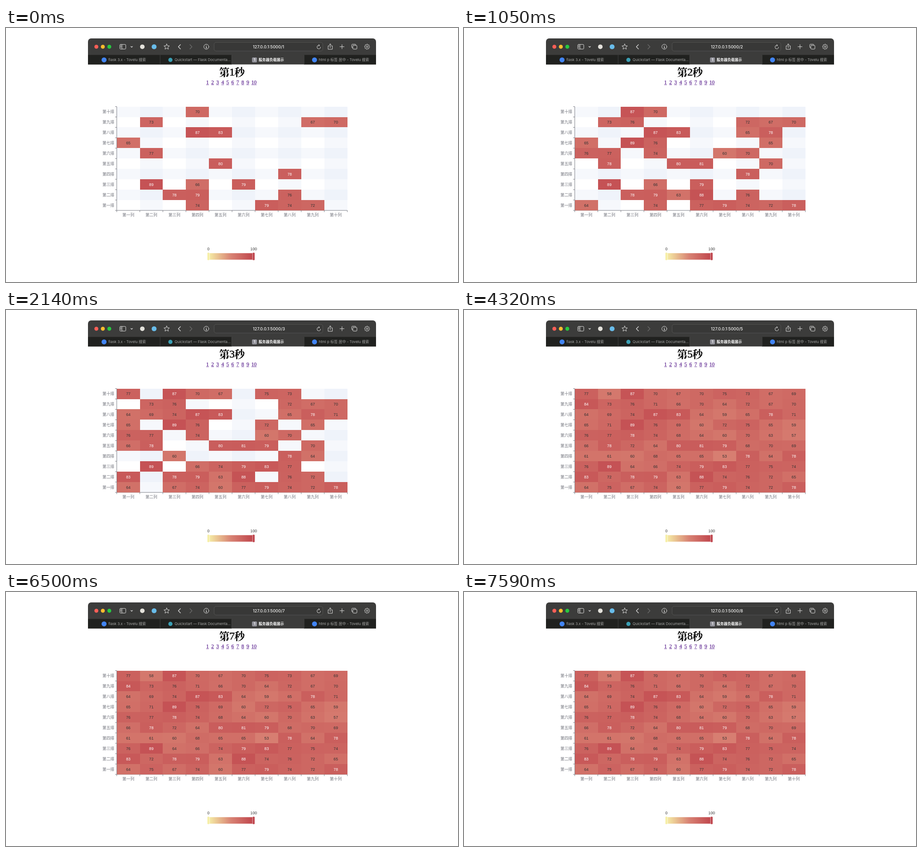
Recreate the animation shown at these times as an HTML page. Size 998x561 px, loop 8 s.

```html
<!DOCTYPE html>
<html lang="zh">
<head>
<meta charset="utf-8">
<title>服务器负载展示</title>
<style>
  html, body { margin: 0; width: 100%; height: 100%; overflow: hidden; background: #fff; }
  svg { display: block; width: 100vw; height: 100vh; }
  text { white-space: pre; }
  .ui { font: 8px Inter, "Noto Sans CJK SC", "Noto Sans CJK", sans-serif; fill: #a6a6a5; }
  .chart { font: 8.7px "Liberation Sans", "Noto Sans CJK SC", "Noto Sans CJK", sans-serif; }
  .serif { font-family: "Liberation Serif", "Noto Serif CJK SC", "Noto Sans CJK SC", "Noto Sans CJK", serif; }
  .icon { fill: none; stroke: #dededd; stroke-width: 1; stroke-linecap: round; stroke-linejoin: round; }
  .crisp { shape-rendering: crispEdges; }
</style>
</head>
<body>
<svg id="stage" viewBox="0 0 998 561">
  <defs>
    <linearGradient id="ramp">
      <stop offset="0" stop-color="#f6efa6"/>
      <stop offset=".5" stop-color="#d88273"/>
      <stop offset="1" stop-color="#bf444c"/>
    </linearGradient>
  </defs>

  <!-- browser window -->
  <path d="M181 80.5V30a7 7 0 0 1 7-7H810a7 7 0 0 1 7 7V80.5Z" fill="#3c3c3b"/>
  <path d="M181 59.5H498V80.5H181ZM658 59.5H817V80.5H658Z" fill="#20211f"/>
  <path d="M340.3 59.5V80.5M498.3 59.5V80.5M658.3 59.5V80.5" stroke="#4a4a49" stroke-width=".8"/>
  <circle cx="199.5" cy="41.4" r="4.3" fill="#fe5f57"/>
  <circle cx="213.8" cy="41.4" r="4.3" fill="#febc2e"/>
  <circle cx="228.1" cy="41.4" r="4.3" fill="#28c840"/>
  <rect x="459.5" y="31.7" width="240" height="19.2" rx="4.5" fill="#383837" stroke="#5b5b5a" stroke-width=".8"/>
  <circle cx="301" cy="41.4" r="5" fill="#e4e2dc"/>
  <circle cx="327" cy="41.4" r="5.4" fill="#68bcea"/>
  <g class="icon">
    <rect x="251.3" y="36.3" width="13.2" height="10.2" rx="1.8"/>
    <path d="M256 36.3V46.5M253 38.8h1.4M253 40.8h1.4M253 42.8h1.4"/>
    <path d="M275.6 40.6l1.9 1.9 1.9-1.9" stroke-width="1.2"/>
    <path id="star"/>
    <path d="M385.2 36.8l-4.7 4.7 4.7 4.7" stroke-width="1.3"/>
    <path d="M406 36.8l4.7 4.7-4.7 4.7" stroke="#6d6d6c" stroke-width="1.3"/>
    <circle cx="442.3" cy="41.4" r="5.5"/>
    <path d="M441.5 40.7h1v3.3M441.2 44h2.6M442.3 38.4v.2"/>
    <path d="M694.5 42.2a3.9 3.9 0 1 1-3.9-3.9h1.4M690.4 36.4l2 1.9-2 1.9"/>
    <path d="M713.6 39.5H711.2V47H720.6V39.5H718.2M715.9 43.5V35.2M713.6 37.2l2.3-2.2 2.3 2.2"/>
    <path d="M737.2 41.3h9.4M741.9 36.6V46"/>
    <path d="M765.7 43.7H765a1.6 1.6 0 0 1-1.6-1.6V37.5a1.6 1.6 0 0 1 1.6-1.6H770.8a1.6 1.6 0 0 1 1.6 1.6V38.2"/>
    <rect x="765.8" y="38.3" width="9" height="8.3" rx="1.6"/>
    <path id="gear"/>
    <circle cx="797.2" cy="41.4" r="1.9"/>
  </g>
  <text class="ui" id="url" x="545" y="44.9" style="font-size:9.2px;fill:#f4f4f3;font-weight:500"></text>

  <circle cx="216.5" cy="70.4" r="5.5" fill="#4285f4"/>
  <text class="ui" x="226" y="73.3">flask 3.x - Tovelu 搜索</text>
  <circle cx="363" cy="70.4" r="4.6" fill="#3ba0b5"/>
  <text class="ui" x="372.3" y="73.3">Quickstart — Flask Documenta...</text>
  <rect x="543.2" y="65" width="11" height="11" rx="2.2" fill="#93939b"/>
  <text class="ui" x="548.7" y="73.4" text-anchor="middle" style="fill:#fff;font-weight:600">1</text>
  <text class="ui" x="557.7" y="73.3" style="fill:#fff;font-weight:700">服务器负载展示</text>
  <circle cx="681.2" cy="70.4" r="5.5" fill="#4285f4"/>
  <text class="ui" x="690.5" y="73.3">html p 标签 居中 - Tovelu 搜索</text>

  <!-- page heading -->
  <g class="serif" text-anchor="middle" font-size="23.2" font-weight="700">
    <text x="482.1" y="105.6">第</text>
    <text id="second" x="498.9" y="105.4" font-size="24" font-weight="400" stroke="#000" stroke-width=".45"></text>
    <text x="515.6" y="105.6">秒</text>
  </g>
  <g id="links" class="serif" font-size="11.6" fill="#551a8b" text-anchor="middle"
     stroke="#551a8b" stroke-width=".2"></g>

  <g id="chart" class="chart"></g>

  <!-- colour scale -->
  <rect x="447" y="497.3" width="100" height="14.4" fill="url(#ramp)"/>
  <rect x="444.4" y="496" width="5" height="17" rx="1.6" fill="#f6efa6" stroke="#fff" stroke-width=".6"/>
  <rect x="544.3" y="496" width="5" height="17" rx="1.6" fill="#bf444c" stroke="#fff" stroke-width=".6"/>
  <g class="chart" text-anchor="middle" fill="#333">
    <text x="446.8" y="490.5">0</text>
    <text x="546.8" y="490.5">100</text>
  </g>
</svg>
<script>
const $ = id => document.getElementById(id);

function add(parent, tag, attrs, text = '') {
  const el = document.createElementNS('http://www.w3.org/2000/svg', tag);
  for (const key in attrs) el.setAttribute(key, attrs[key]);
  el.textContent = text;
  return parent.appendChild(el);
}

// Closed outline through n points around a centre
const ring = (cx, cy, n, radius) => 'M' + Array.from({ length: n }, (_, i) => {
  const a = i / n * 2 * Math.PI - Math.PI / 2;
  return [cx + radius(i) * Math.cos(a), cy + radius(i) * Math.sin(a)].map(v => v.toFixed(2));
}).join('L') + 'Z';
$('star').setAttribute('d', ring(354.8, 41.6, 10, i => i % 2 ? 2.9 : 6.4));
$('gear').setAttribute('d', ring(797.2, 41.4, 32, i => i % 4 < 2 ? 5.7 : 4.5));

for (let i = 1; i <= 10; i++) {
  const x = i < 10 ? 433.9 + i * 11.1 : 547.6, half = i < 10 ? 2.9 : 5.7;
  add($('links'), 'text', { x, y: 123.8 }, i);
  add($('links'), 'path', { d: `M${x - half} 125.4h${half * 2}`, 'stroke-width': .8 });
}

// Heat map rows from top to bottom: loads, then the second in which each one shows up
const rows = [
  ['77 58 87 70 67 70 75 73 67 69', '3421343354'],
  ['84 73 76 71 66 70 64 72 67 70', '4124445211'],
  ['64 69 74 87 83 64 59 65 78 71', '3331154223'],
  ['65 71 89 76 69 60 72 75 65 59', '1422443425'],
  ['76 77 78 74 68 64 60 70 63 57', '2152542245'],
  ['66 78 72 64 80 81 79 68 70 69', '3255123524'],
  ['61 61 60 68 65 65 53 78 64 78', '5435555134'],
  ['76 89 64 66 74 79 83 77 75 74', '5141313354'],
  ['83 72 78 79 63 88 74 76 72 65', '3411225135'],
  ['64 75 67 74 60 77 79 74 72 78', '2531321112']
];
const numerals = '一二三四五六七八九十';
const left = 244.6, top0 = 173.6, cellW = 50.9, cellH = 22.93;
const right = left + 10 * cellW, bottom = top0 + 10 * cellH;
const chart = $('chart');

// Upper half of the colour scale
const low = [216, 130, 115], high = [191, 68, 76];
const heat = v => `rgb(${low.map((c, i) => Math.round(c + (high[i] - c) * (v - 50) / 50))})`;

const bands = add(chart, 'g', { class: 'crisp', fill: 'rgba(210,219,238,.2)' });
for (let i = 0; i < 10; i += 2) {
  add(bands, 'rect', { x: left + (i + 1) * cellW, y: top0, width: cellW, height: bottom - top0 });
  add(bands, 'rect', { x: left, y: top0 + i * cellH, width: right - left, height: cellH });
}

let axes = `M${left} ${top0}V${bottom}H${right}`;
for (let i = 0; i <= 10; i++)
  axes += `M${left} ${top0 + i * cellH}h-3.6M${left + i * cellW} ${bottom}v3.6`;
add(chart, 'path', { d: axes, fill: 'none', stroke: '#6e7079', 'stroke-width': .9 });

for (let i = 0; i < 10; i++) {
  add(chart, 'text', { x: 239, y: top0 + (i + .5) * cellH + 3.1, 'text-anchor': 'end', fill: '#6e7079' },
    `第${numerals[9 - i]}排`);
  add(chart, 'text', { x: left + (i + .5) * cellW, y: 415.9, 'text-anchor': 'middle', fill: '#6e7079' },
    `第${numerals[i]}列`);
}

const cells = rows.flatMap(([loads, starts], r) => loads.split(' ').map((load, c) => {
  const x = left + c * cellW, y = top0 + r * cellH;
  const node = add(chart, 'g', {});
  add(node, 'rect', { x, y, width: cellW, height: cellH, fill: heat(load), class: 'crisp' });
  add(node, 'text', {
    x: x + cellW / 2, y: y + cellH / 2 + 3.1, 'text-anchor': 'middle', fill: load > 77 ? '#fff' : '#333'
  }, load);
  return { node, start: +starts[c] };
}));

const loop = 8000, firstStep = 1050, step = 1090;
let shown = 0;

function show(second) {
  shown = second;
  $('second').textContent = second;
  $('url').textContent = `127.0.0.1:5000/${second}`;
  for (const { node, start } of cells)
    node.setAttribute('visibility', start <= second ? 'visible' : 'hidden');
}

const begin = performance.now();
function tick() {
  const t = (performance.now() - begin) % loop;
  const second = t < firstStep ? 1 : 2 + Math.floor((t - firstStep) / step);
  if (second !== shown) show(second);
  requestAnimationFrame(tick);
}
tick();
</script>
</body>
</html>
```
